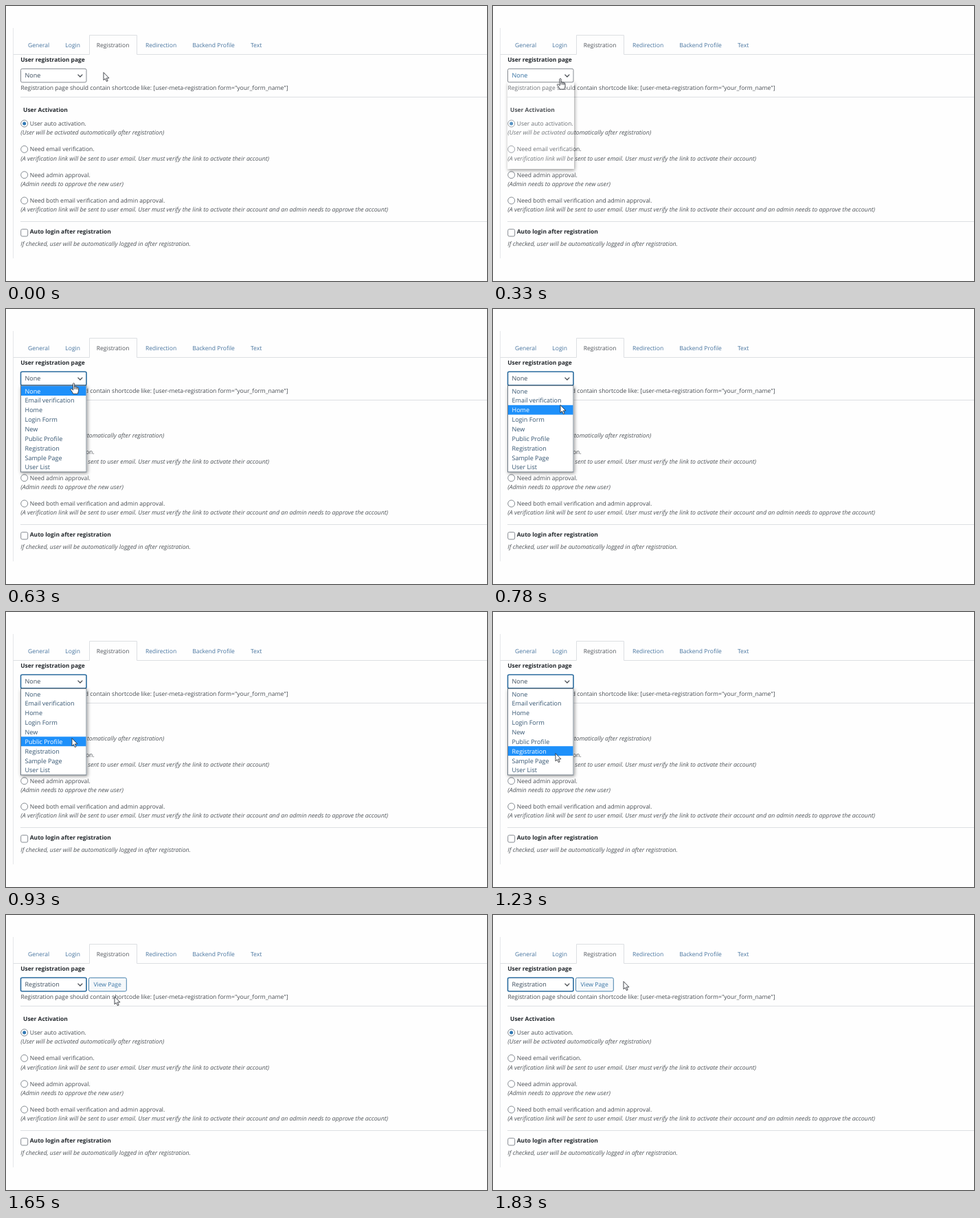
An HTML page for the animation above (1.86 s loop, 700 px wide and 400 px high).

```html
<!DOCTYPE html>
<html lang="en">
<head>
<meta charset="utf-8">
<title>Registration settings</title>
<style>
  html, body { margin: 0; width: 100%; height: 100%; overflow: hidden; background: #fefefe; }
  svg { position: absolute; left: 0; top: 0; width: 700px; height: 400px; }
  text { font: 8.54px "Open Sans", "Noto Sans", sans-serif; fill: #454a50; text-rendering: geometricPrecision; white-space: pre; }
  .tab { fill: #47749f; }
  .active { fill: #50555b; }
  .bold { font-weight: 700; font-size: 8.45px; fill: #23282d; }
  .note { font-style: italic; font-size: 8.78px; fill: #50555a; }
  .field { font-size: 9.03px; fill: #38495a; }
  .line { fill: none; stroke: #dcdfe2; }
  .control { fill: #fff; stroke: #858b92; }
  #select.focus { stroke: #2b6c9f; stroke-width: 1.6; }
  #value.blue { fill: #2f6d9f; }
  #button rect { fill: #f5f8fa; stroke: #4681ad; }
  #button text { fill: #3874a4; font-size: 8.6px; }
  #list rect.box { fill: #fff; stroke: #6f7b86; }
  #mark { fill: #1e90fa; }
  #list text { fill: #345470; }
  #list text.on { fill: #fff; }
  #shadow { position: absolute; left: 21px; top: 111px; width: 97px; height: 126px; background: rgba(255, 255, 255, .2); box-shadow: 1px 2px 5px rgba(0, 0, 0, .4); }
  .pointer { fill: #fff; stroke: #30343a; stroke-width: .9; stroke-linejoin: round; stroke-linecap: round; }
</style>
</head>
<body>
<svg viewBox="0 0 700 400">
  <path class="line" d="M10.5 32V367" stroke-opacity=".75"/>
  <path class="line" d="M10.5 70.5H121.5V42.5H190.5V70.5H700M21 132.5H700M21 313.5H700"/>
  <text class="tab" x="32" y="59.7">General</text>
  <text class="tab" x="86.3" y="59.7">Login</text>
  <text class="active" x="131.8" y="59.7">Registration</text>
  <text class="tab" x="203" y="59.7">Redirection</text>
  <text class="tab" x="271.2" y="59.7">Backend Profile</text>
  <text class="tab" x="356" y="59.7">Text</text>

  <text class="bold" x="21.2" y="80.8">User registration page</text>
  <rect id="select" class="control" x="21.5" y="91.3" width="95.5" height="19.7" rx="2"/>
  <text id="value" class="field" x="27.5" y="104.4">None</text>
  <path d="M104.5 99.6l3.4 3.4 3.4-3.4" fill="none" stroke="#474c52" stroke-width="1.3"/>
  <g id="button">
    <rect x="120.5" y="91.3" width="54.8" height="19.7" rx="2"/>
    <text x="127.4" y="104.4">View Page</text>
  </g>
  <text x="21.5" y="121.8">Registration page should contain shortcode like: [user-meta-registration form="your_form_name"]</text>

  <text class="bold" x="25" y="153.6">User Activation</text>
  <g id="options"></g>

  <rect class="control" x="21.7" y="324.7" width="10" height="10.3" rx="2"/>
  <text class="bold" x="34.8" y="330.8">Auto login after registration</text>
  <text class="note" x="21.3" y="349.4">If checked, user will be automatically logged in after registration.</text>
</svg>
<div id="shadow"></div>
<svg viewBox="0 0 700 400">
  <g id="list">
    <rect class="box" x="21.5" y="111.5" width="95.5" height="125.5"/>
    <rect id="mark" x="22" width="94.5" height="13.9"/>
  </g>
  <path id="arrow" class="pointer" d="M0 0V10.9L2.5 8.6L4.3 12.7L6.1 11.9L4.3 7.9H7.6Z"/>
  <g id="hand" class="pointer">
    <path d="M-1.1 1C-1.1-.4 1.1-.4 1.1 1V5.6C1.3 4.6 3.2 4.7 3.3 6C3.8 5.2 5.2 5.5 5.3 6.6C6 6 7.1 6.5 7.1 7.6V11C7.1 12.7 6 13.6 5.8 15.6H-.9C-1.3 13.4-3.3 11.6-4.4 9.7C-5 8.3-3.4 7.6-2.4 8.7L-1.1 10Z"/>
    <path d="M1.1 5.6V8.5M3.3 6V8.7M5.3 6.6V9" fill="none"/>
  </g>
</svg>
<script>
const LOOP = 1860, TICK = 30;
const OPEN = 330, FOCUS = 570, CLOSE = 1440, SHOW_BUTTON = 1470;
const ROW = 13.85, LIST_TOP = 112.1;
const $ = id => document.getElementById(id);

function add(parent, tag, attrs, text = "") {
  const node = document.createElementNS("http://www.w3.org/2000/svg", tag);
  for (const key in attrs) node.setAttribute(key, attrs[key]);
  node.textContent = text;
  parent.append(node);
  return node;
}

const sent = "(A verification link will be sent to user email. User must verify the link to activate their account";
[
  ["User auto activation.", "(User will be activated automatically after registration)"],
  ["Need email verification.", sent + ")"],
  ["Need admin approval.", "(Admin needs to approve the new user)"],
  ["Need both email verification and admin approval.", sent + " and an admin needs to approve the account)"]
].forEach(([label, note], i) => {
  const y = 171 + i * 37.35, group = $("options");
  add(group, "circle", { class: "control", cx: 26.7, cy: y, r: 5 });
  if (i === 0) add(group, "circle", { cx: 26.7, cy: y, r: 2.5, fill: "#2f78b4" });
  add(group, "text", { x: 34.8, y: y + 3 }, label);
  add(group, "text", { class: "note", x: 21.3, y: y + 16.4 }, note);
});

const items = ["None", "Email verification", "Home", "Login Form", "New",
  "Public Profile", "Registration", "Sample Page", "User List"
].map((name, i) => add($("list"), "text", { class: "field", x: 27.5, y: 122.6 + i * ROW }, name));

// Pointer path: time, x, y of the tip
const path = [
  [0, 142, 97], [120, 126, 99], [240, 102, 103], [330, 98, 105.5], [510, 98.5, 107],
  [660, 98.5, 108], [780, 98, 140], [930, 96, 184], [1080, 92, 204], [1140, 92, 204.5],
  [1230, 91, 206], [1440, 91, 206], [1530, 116, 170], [1650, 158, 119],
  [1740, 178, 104], [1830, 190, 97]
];

function pointerAt(t) {
  const i = path.findIndex(p => p[0] > t);
  if (i < 0) return path[path.length - 1].slice(1);
  const [t0, x0, y0] = path[i - 1], [t1, x1, y1] = path[i];
  const k = (t - t0) / (t1 - t0);
  return [x0 + (x1 - x0) * k, y0 + (y1 - y0) * k];
}

const show = (id, on) => $(id).style.display = on ? "" : "none";

function draw(t) {
  const [x, y] = pointerAt(t);
  const chosen = t >= CLOSE, open = t >= OPEN && !chosen;
  const overSelect = x < 117 && y > 91 && y < 111;

  $("select").classList.toggle("focus", t >= FOCUS);
  $("value").classList.toggle("blue", overSelect && t < FOCUS);
  $("value").textContent = chosen ? "Registration" : "None";
  show("button", t >= SHOW_BUTTON);

  show("shadow", open);
  show("list", open);
  $("list").style.opacity = Math.min(1, (t - OPEN) / 90);
  const row = Math.max(0, Math.min(8, Math.floor((y - LIST_TOP) / ROW)));
  $("mark").setAttribute("y", LIST_TOP + row * ROW);
  items.forEach((item, i) => item.classList.toggle("on", i === row));

  show("hand", overSelect);
  show("arrow", !overSelect);
  for (const id of ["hand", "arrow"]) $(id).setAttribute("transform", `translate(${x} ${y})`);
}

const start = performance.now();
function frame() {
  const t = (performance.now() - start) % LOOP;
  draw(Math.floor(t / TICK) * TICK);
  requestAnimationFrame(frame);
}
frame();
</script>
</body>
</html>
```
